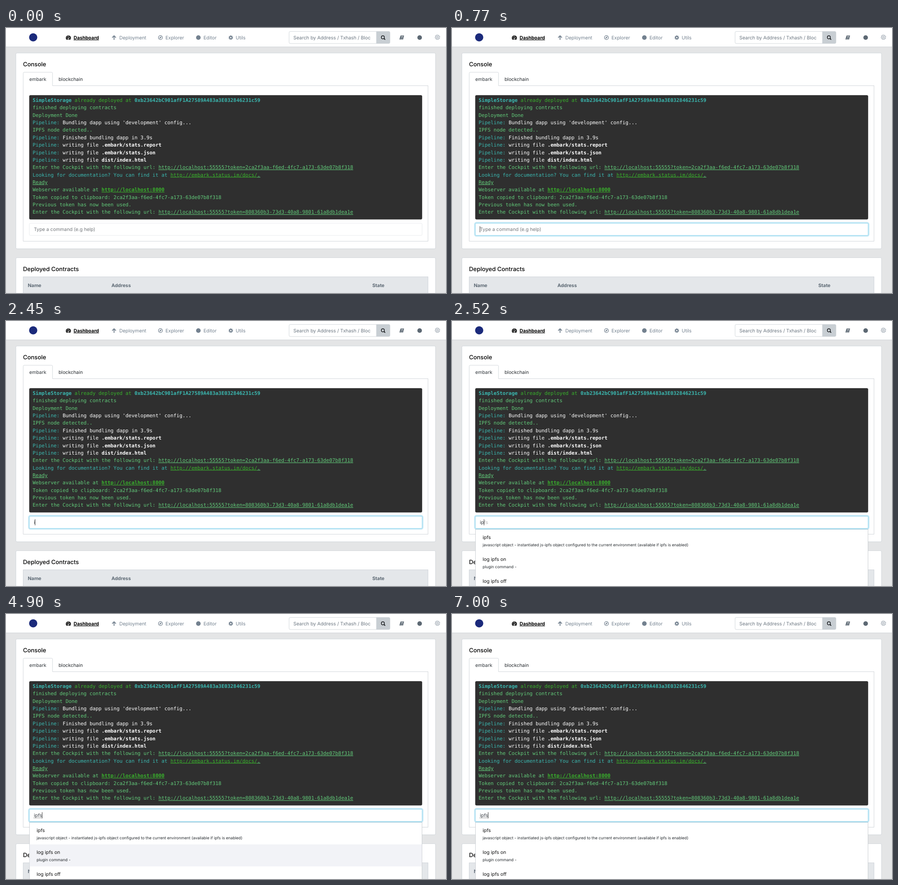
Write an HTML page that moves like this. It is 963 px wide and 581 px high and loops after 7140 ms.

```html
<!DOCTYPE html>
<html lang="en">
<head>
<meta charset="utf-8">
<title>Console</title>
<style>
  html, body { margin: 0; width: 100%; height: 100%; overflow: hidden; background: #e4e5e6; }
  svg { display: block; width: 100vw; height: 100vh; text-rendering: geometricPrecision; }
  text { font: 10.4px Inter, sans-serif; white-space: pre; }
  .bold { font-weight: 700; }
  .title { font-size: 12.9px; font-weight: 500; }
  .small { font-size: 8.65px; fill: #23282c; }
  .mono { font: 10.907px "DejaVu Sans Mono", monospace; }
  .link { text-decoration: underline; }
  .nav { fill: #73818f; }
  .edge { fill: #fff; stroke: #c8ced3; stroke-width: .8; }
  .cyan { fill: #3bb8b0; }
  .green { fill: #39b12c; }
  .mint { fill: #62cb7a; }
  .white { fill: #fff; }
</style>
</head>
<body>
<svg viewBox="0 0 963 581" xml:space="preserve">
  <rect width="963" height="581" fill="#e4e5e6"/>
  <rect width="963" height="41" fill="#fff"/>
  <path d="M0 41.4H963" stroke="#c8ced3" stroke-width=".8"/>

  <circle cx="59.5" cy="20.5" r="9" fill="#1b2a7b"/>
  <g id="nav"></g>

  <g id="icons">
    <path d="M132.4 25.6A5.6 5.6 0 1 1 140.6 25.6Z" fill="#111"/>
    <g fill="#fff">
      <circle cx="133.3" cy="22" r=".8"/><circle cx="134.3" cy="19.2" r=".8"/>
      <circle cx="136.6" cy="18" r=".8"/><circle cx="139.8" cy="22" r=".8"/>
    </g>
    <path d="M136.3 23.6L138.4 19" stroke="#fff" stroke-width="1"/>
    <circle cx="136.3" cy="23.6" r="1.2" fill="#fff"/>
    <path d="M236.5 26V17.5M232.4 21.2L236.5 17L240.6 21.2" fill="none" stroke="#73818f" stroke-width="1.9"/>
    <circle cx="338" cy="21" r="4.3" fill="none" stroke="#73818f" stroke-width="1.3"/>
    <path d="M340.5 18.5L339 22L335.5 23.5L337 20Z" fill="#73818f"/>
    <circle cx="421" cy="21" r="5" fill="#73818f"/>
    <path d="M863.6 16.4H871.2L869 25.6H862Q860.6 24.8 861.4 23.4Z" fill="#5c6873"/>
    <path d="M862.4 24.2H868.6M865 18.6H869M864.6 20.4H868.6" stroke="#fff" stroke-width=".8"/>
    <circle cx="905.3" cy="21" r="5" fill="#5c6873"/>
  </g>

  <rect class="edge" x="619.6" y="7.6" width="220.6" height="26.4" rx="2.5"/>
  <path d="M810.4 7.6H838Q840.4 7.6 840.4 10V31.6Q840.4 34 838 34H810.4Z" fill="#c8ced3"/>
  <path d="M827.3 23L829.8 25.6" stroke="#181b1e" stroke-width="1.9"/>
  <circle cx="824.8" cy="20.4" r="3.3" fill="none" stroke="#181b1e" stroke-width="1.5"/>
  <text x="629" y="24.8" fill="#6b7680">Search by Address / Txhash / Bloc</text>

  <rect class="edge" x="21.7" y="54.8" width="918.4" height="429.2" rx="2.5"/>
  <text class="title" x="37.3" y="84">Console</text>
  <rect class="edge" x="37.7" y="126.4" width="886" height="341"/>
  <path class="edge" d="M37.7 126.8V99.4Q37.7 97 40.1 97H99.4Q101.8 97 101.8 99.4V126.8"/>
  <path d="M38.1 126.4H101.4" stroke="#fff" stroke-width="1.2"/>
  <text x="51" y="115.8" fill="#2f353a">embark</text>
  <text x="115" y="115.8" fill="#23282c">blockchain</text>
  <rect x="50.8" y="147.3" width="860" height="272.5" rx="3" fill="#2f2f2f"/>
  <g id="log"></g>

  <rect class="edge" x="21.7" y="503.6" width="918.4" height="100" rx="2.5"/>
  <text class="title" x="37.3" y="532.5">Deployed Contracts</text>
  <rect x="37.7" y="545.5" width="886" height="60" fill="#e4e7ea" stroke="#c8ced3" stroke-width=".8"/>
  <g class="bold" fill="#5c6873">
    <text class="bold" x="47.7" y="567.8">Name</text>
    <text class="bold" x="230.8" y="567.8">Address</text>
    <text class="bold" x="801.7" y="567.8">State</text>
  </g>

  <g id="menu">
    <rect x="51.3" y="456.6" width="859.2" height="140" fill="#fff" stroke="#bfc4c8" stroke-width=".8"/>
    <rect id="pick" x="51.7" width="858.4" height="48.2" fill="#f2f3f7"/>
  </g>

  <rect id="glow" x="49.7" y="426.7" width="862.6" height="29.4" rx="3.5" fill="none" stroke="#20a8d8" stroke-width="2.4"/>
  <rect id="field" x="51.1" y="428.1" width="859.6" height="26.6" rx="2.2" fill="#fff" stroke-width=".8"/>
  <text id="hint" x="61" y="445.4" fill="#73777b">Type a command (e.g help)</text>
  <text x="61" y="445.4"><tspan id="typed" fill="#3c4248"></tspan><tspan id="ghost" fill="#b4b4b4"></tspan></text>
  <path id="squiggle" d="M60.5 447.2H79" stroke="#777" stroke-width="1.2" stroke-dasharray="1.4 1"/>
  <rect id="caret" y="434.5" width=".9" height="13.5" fill="#222"/>
</svg>
<script>
  const $ = id => document.getElementById(id);
  const add = (parent, markup) => parent.insertAdjacentHTML('beforeend', markup);

  // Header
  const tabs = [['Deployment', 248], ['Explorer', 349], ['Editor', 432.3], ['Utils', 502.7]];
  add($('nav'), '<text class="bold link" x="148" y="24.8">Dashboard</text>');
  for (const [label, x] of tabs) add($('nav'), `<text class="nav" x="${x}" y="24.8">${label}</text>`);

  function gear(cx, cy, inner, outer) {
    const points = Array.from({ length: 32 }, (_, i) => {
      const r = (i + 1) % 4 < 2 ? outer : inner;
      const a = (i - .5) * Math.PI / 16;
      return `${(cx + r * Math.cos(a)).toFixed(2)},${(cy + r * Math.sin(a)).toFixed(2)}`;
    });
    return `<polygon points="${points.join(' ')}" stroke-linejoin="round"`;
  }
  add($('icons'), gear(492, 21, 3.7, 5.1) + ' fill="#73818f"/><circle cx="492" cy="21" r="1.6" fill="#fff"/>');
  add($('icons'), gear(944.3, 20.2, 4, 5.2) + ' fill="none" stroke="#73818f" stroke-width=".9"/>' +
    '<circle cx="944.3" cy="20.2" r="1.9" fill="none" stroke="#73818f" stroke-width=".9"/>');

  // Terminal: each line is a list of [classes, text]
  const cockpit = 'Enter the Cockpit with the following url: ';
  const url = 'http://localhost:55555?token=';
  const token = '2ca2f3aa-f6ed-4fc7-a173-63de07b8f318';
  const pipeline = (text, file = '') => [['cyan', 'Pipeline: '], ['white', text], ['white bold', file]];
  const lines = [
    [['cyan bold', 'SimpleStorage'], ['green', ' already deployed at '],
      ['cyan bold', '0xb23642bC901afF1A27589A483a3E032846231c59']],
    [['mint', 'finished deploying contracts']],
    [['mint', 'Deployment Done']],
    pipeline("Bundling dapp using 'development' config..."),
    [['mint', 'IPFS node detected..']],
    pipeline('Finished bundling dapp in 3.9s'),
    pipeline('writing file ', '.embark/stats.report'),
    pipeline('writing file ', '.embark/stats.json'),
    pipeline('writing file ', 'dist/index.html'),
    [['mint', cockpit], ['mint link', url + token]],
    [['cyan', 'Looking for documentation? You can find it at '],
      ['green link', 'http://embark.status.im/docs/'], ['mint link', '.']],
    [['mint link', 'Ready']],
    [['mint', 'Webserver available at '], ['green bold link', 'http://localhost:8000']],
    [['mint', 'Token copied to clipboard: ' + token]],
    [['mint', 'Previous token has now been used.']],
    [['mint', cockpit], ['mint link', url + '808360b3-73d3-40a8-9801-61a8db1dea1e']]
  ];
  lines.forEach((parts, i) => add($('log'),
    `<text class="mono" x="58.3" y="${162 + i * 16.36}">` +
    parts.map(([style, text]) => `<tspan class="${style}">${text}</tspan>`).join('') + '</text>'));

  // Suggestions
  const rowTop = 457, rowHeight = 48.2;
  const suggestions = [
    ['ipfs', 'javascript object - instantiated js-ipfs object configured to the current environment (available if ipfs is enabled)'],
    ['log ipfs on', 'plugin command -'],
    ['log ipfs off', 'plugin command -']
  ];
  suggestions.forEach(([name, about], i) => {
    const y = rowTop + i * rowHeight;
    add($('menu'), `<text x="67" y="${y + 20.5}" fill="#111">${name}</text>` +
      `<text class="small" x="67" y="${y + 36.8}">${about}</text>`);
  });

  // Timeline in ms
  const loop = 7140, focusAt = 650, focusTime = 130, blink = 490;
  const typing = [[0, '', ''], [2380, 'i', ''], [2520, 'ip', 'fs'], [2660, 'ipf', 's'], [2800, 'ipfs', '']];
  const picks = [[0, -1], [3920, 0], [4410, 1], [5110, 2], [5390, -1]];
  const carets = [700, 2380, 2520, 2660, 2800, 2940];
  const at = (steps, t) => steps.findLast(step => step[0] <= t);
  const show = (id, on) => $(id).setAttribute('visibility', on ? 'visible' : 'hidden');

  function caretOn(t) {
    const start = carets.findLast(time => time <= t);
    return start !== undefined && Math.floor((t - start) / blink) % 2 === 0;
  }

  function draw(t) {
    const p = Math.min(1, Math.max(0, (t - focusAt) / focusTime));
    const focus = p * p * (3 - 2 * p);
    const mix = (a, b) => Math.round(a + (b - a) * focus);
    $('glow').setAttribute('opacity', focus * .27);
    $('field').setAttribute('stroke', `rgb(${mix(228, 125)},${mix(231, 207)},${mix(234, 235)})`);

    const [, typed, ghost] = at(typing, t);
    $('typed').textContent = typed;
    $('ghost').textContent = ghost;
    show('hint', !typed);
    show('squiggle', typed === 'ipfs');
    $('caret').setAttribute('x', 60.7 + (typed ? $('typed').getComputedTextLength() : 0));
    show('caret', caretOn(t));

    const row = at(picks, t)[1];
    $('menu').style.display = typed.length > 1 ? '' : 'none';
    show('pick', row >= 0);
    $('pick').setAttribute('y', rowTop + Math.max(0, row) * rowHeight);
  }

  const begin = performance.now();
  function tick() {
    draw((performance.now() - begin) % loop);
    requestAnimationFrame(tick);
  }
  tick();
</script>
</body>
</html>
```
